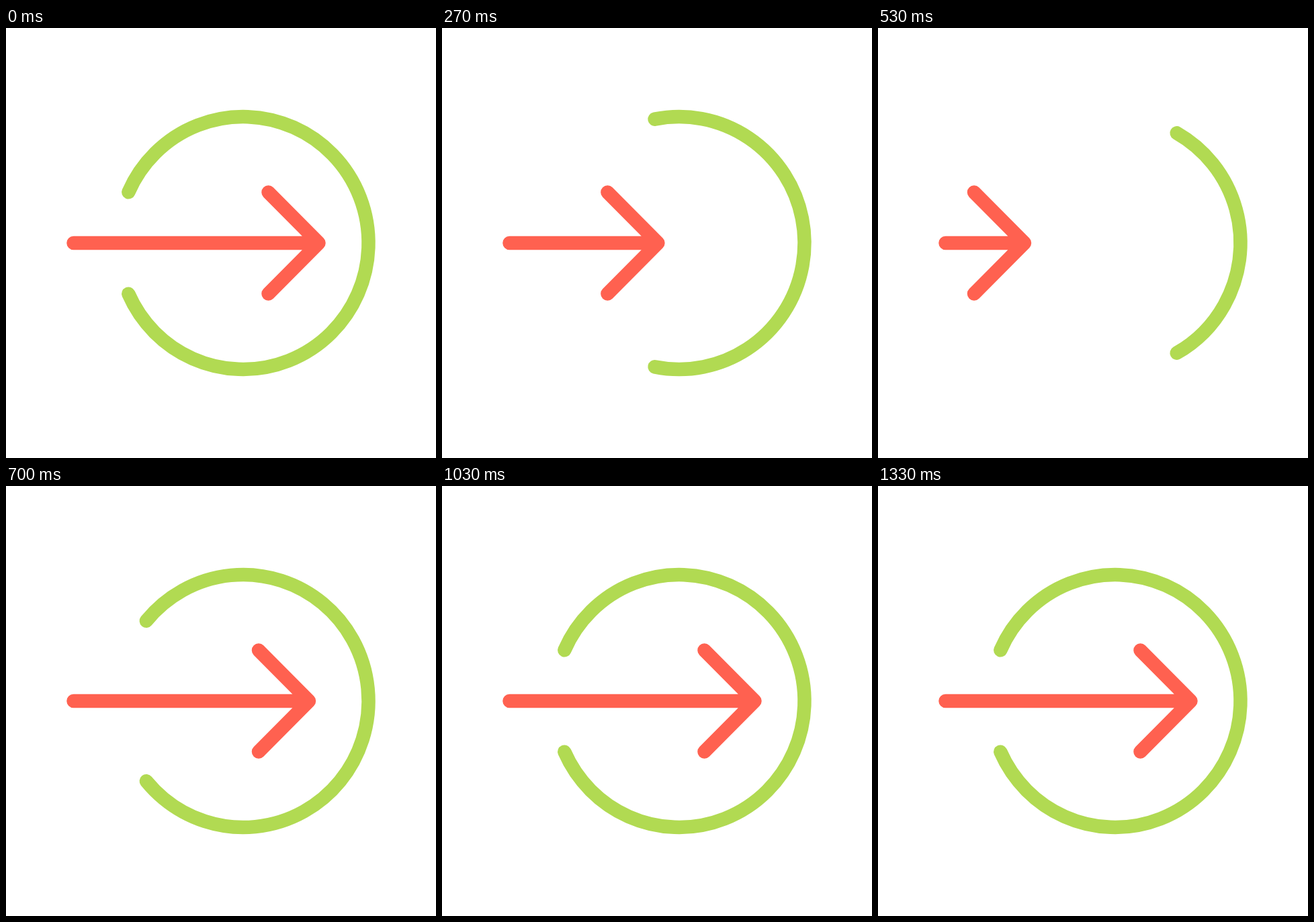
Write an HTML page with a canvas that moves like this. It is 640 px wide and 640 px high and loops after 2 s.

```html
<!DOCTYPE html>
<html lang="en">
<head>
<meta charset="utf-8">
<title>Arrow entering a circle</title>
<style>
  html, body { margin: 0; height: 100%; overflow: hidden; background: #fff; }
  canvas { display: block; }
</style>
</head>
<body>
<canvas width="640" height="640"></canvas>
<script>
const ctx = document.querySelector('canvas').getContext('2d');
const FPS = 30, FRAMES = 60;
const RAD = Math.PI / 180;

// Keys are [frame, value]: arrow pull-back in px, ring opening in degrees
const pullKeys = [[0, 0], [15, 262], [22, 0], [26.5, 124], [31, 0], [35.5, 48], [40, 0]];
const openKeys = [[0, 0], [15, 100], [23, 0]];

function valueAt(keys, frame) {
  const next = keys.findIndex(([at]) => at > frame);
  if (next < 0) return keys[keys.length - 1][1];
  const [t0, v0] = keys[next - 1], [t1, v1] = keys[next];
  const u = (frame - t0) / (t1 - t0);
  return v0 + (v1 - v0) * u * u * (3 - 2 * u);
}

function drawRing(opening) {
  const half = (156.25 - opening) * RAD;
  ctx.strokeStyle = '#b1da52';
  ctx.beginPath();
  ctx.ellipse(353, 320, 186.5, 188, 0, -half, half);
  ctx.stroke();
}

function drawArrow(tip) {
  ctx.strokeStyle = '#ff6150';
  ctx.beginPath();
  ctx.moveTo(100.5, 320);
  ctx.lineTo(tip, 320);
  ctx.moveTo(tip - 75, 244.5);
  ctx.lineTo(tip, 320);
  ctx.lineTo(tip - 75, 395.5);
  ctx.stroke();
}

function draw() {
  // Small lead keeps each step on its 10 ms boundary
  const frame = Math.floor((performance.now() + 4) * FPS / 1000) % FRAMES;
  ctx.clearRect(0, 0, 640, 640);
  ctx.lineWidth = 20.5;
  ctx.lineCap = ctx.lineJoin = 'round';
  drawRing(valueAt(openKeys, frame));
  drawArrow(465.5 - valueAt(pullKeys, frame));
  requestAnimationFrame(draw);
}
draw();
</script>
</body>
</html>
```
